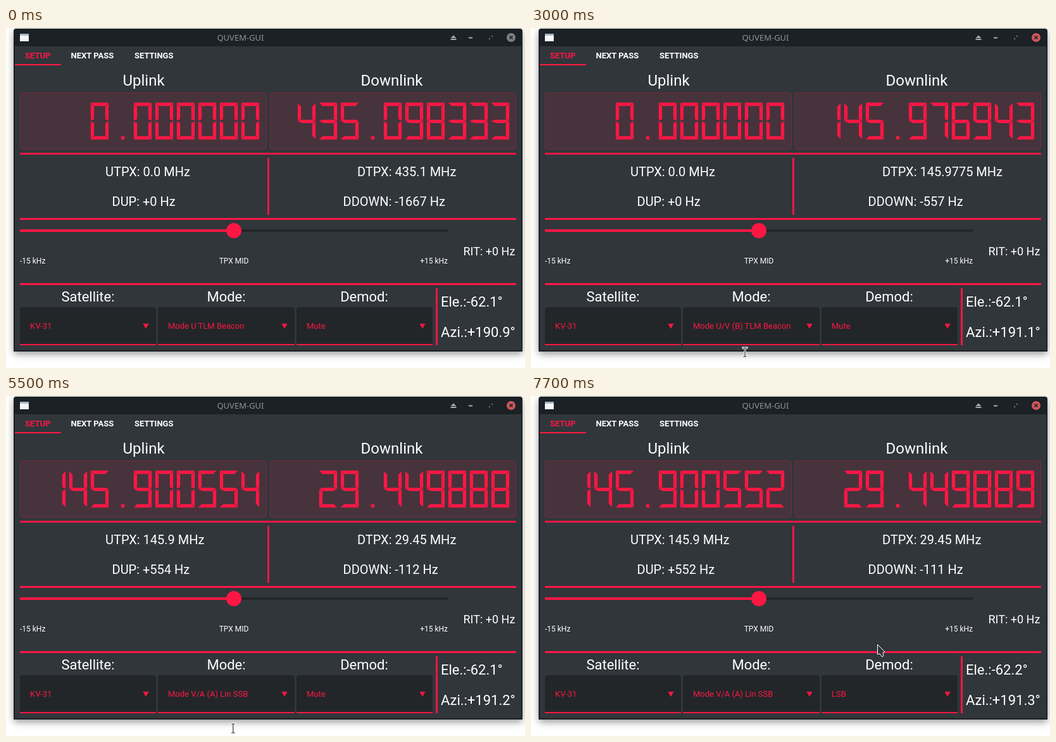
Write an HTML page that moves like this. It is 820 px wide and 537 px high and loops after 8000 ms.

```html
<!DOCTYPE html>
<html lang="en">
<head>
<meta charset="utf-8">
<style>
  html, body { margin: 0; width: 100%; height: 100%; overflow: hidden; background: #fff; }
  svg { display: block; font-family: Roboto, sans-serif; }
  .window { filter: drop-shadow(0 4px 6px rgba(0, 0, 0, .4)); }
</style>
</head>
<body>
<svg id="stage" width="820" height="537" viewBox="0 0 820 537"></svg>
<script>
const RED = '#ff1744', DARK = '#232629', BODY = '#31363b', WHITE = '#fff';
const LOOP = 8000, STEP = 100;

const MODES = ['Mode U TLM Beacon', 'Mode U/V (B) TLM Beacon', 'Mode V/A (A) Lin SSB'];
const DEMODS = ['NFM', 'LSB', 'USB', 'Mute'];
const COMBOS = {
  satellite: { x: 22, w: 215, items: ['KV-31'] },
  mode: { x: 240, w: 216, items: MODES },
  demod: { x: 459, w: 215, items: DEMODS },
};

// State changes over the loop: [time in ms, changed values]
const CHANGES = [
  [0, { satellite: 0, mode: 0, demod: 3, menu: null, active: false, beam: false,
        up: 0, down: 435.1, dup: 0, ddown: -1667, ele: '-62.1', azi: '+190.9' }],
  [900, { ddown: -1665 }],
  [1500, { ddown: -1663, azi: '+191.0', active: true, menu: 'mode' }],
  [2100, { ddown: -1662 }],
  [2400, { menu: null, mode: 1, beam: true }],
  [2500, { down: 145.9775, ddown: -557 }],
  [3000, { azi: '+191.1' }],
  [3300, { beam: false }],
  [3400, { ddown: -556 }],
  [3700, { menu: 'mode' }],
  [4200, { azi: '+191.2' }],
  [4400, { ddown: -555 }],
  [4900, { menu: null, mode: 2, beam: true, up: 145.9, down: 29.45, dup: 555, ddown: -112 }],
  [5500, { dup: 554 }],
  [5800, { beam: false }],
  [6200, { dup: 553, azi: '+191.3' }],
  [6600, { menu: 'demod' }],
  [7200, { dup: 552, ddown: -111, ele: '-62.2' }],
  [7700, { menu: null, demod: 1 }],
];

// Pointer path: [time, x, y]
const PATH = [
  [500, 61, 1], [1300, 337, 469], [1800, 337, 469], [1900, 337.5, 478], [2200, 337.5, 512],
  [3200, 337.5, 512], [3500, 333, 476], [3900, 333, 476], [4600, 357.5, 525],
  [5700, 358.5, 525], [5800, 337, 510], [5900, 337, 510], [6500, 545, 482],
  [6900, 545, 482], [7500, 547, 392], [LOOP, 547, 392],
];

const rect = (x, y, w, h, fill, extra = '') =>
  `<rect x="${x}" y="${y}" width="${w}" height="${h}" fill="${fill}" ${extra}/>`;
const path = (d, extra) => `<path d="${d}" ${extra}/>`;
const text = (x, y, size, str, fill = WHITE, extra = '') =>
  `<text x="${x}" y="${y}" font-size="${size}" fill="${fill}" ${extra}>${str}</text>`;
const MIDDLE = 'text-anchor="middle"';

// Seven-segment digits
const LEN = 29, THICK = 5, HALF = 2, ADVANCE = 34;
const E = LEN - 1, I = E - THICK;
const SEGMENTS = [
  [0, 0, [0, 0, E, 0, I, THICK, THICK, THICK]],
  [0, 1, [0, 0, THICK, THICK, THICK, LEN - 4, 0, LEN - 2]],
  [E, 1, [0, 0, 0, LEN - 2, -THICK, LEN - 4, -THICK, THICK]],
  [0, LEN, [0, 0, THICK, -HALF, I, -HALF, E, 0, I - 2, 3, THICK + 2, 3]],
  [0, LEN + 1, [0, 0, THICK, HALF, THICK, I - 1, 0, LEN - 2]],
  [E, LEN + 1, [0, 0, 0, LEN - 2, -THICK, I - 1, -THICK, HALF]],
  [0, 2 * LEN, [0, 0, E, 0, I, -THICK, THICK, -THICK]],
  [14, 2 * LEN, [0, 0, THICK, 0, THICK, -THICK, 0, -THICK]],
];
const GLYPHS = { 0: '012456', 1: '25', 2: '02346', 3: '02356', 4: '1235', 5: '01356',
                 6: '013456', 7: '025', 8: '0123456', 9: '012356', '.': '7' };

const segment = (ox, oy, index) => {
  const [dx, dy, pts] = SEGMENTS[index];
  return 'M' + pts.map((v, i) => v + (i % 2 ? oy + dy : ox + dx)).join(' ') + 'Z';
};

function lcd(x, width, mhz) {
  const chars = mhz.toFixed(6).padStart(11);
  const d = [...chars].map((c, i) =>
    [...(GLYPHS[c] || '')].map(s => segment(x + 10 + i * ADVANCE, 118, s)).join('')).join('');
  return rect(x + .5, 102.5, width - 1, 89, RED,
    `rx="4" fill-opacity=".1" stroke="${RED}" stroke-opacity=".3"`) +
    path(d, `fill="${RED}" stroke="${RED}" stroke-width=".3"`);
}

function titleBar(active) {
  const close = active ? '#cc575d' : '#7c8184';
  return rect(12, 1, 804, 510, '#1b2124', 'rx="4" class="window"') +
    rect(12, 300, 804, 211, '#1b2124') +
    rect(14, 29, 800, 480, BODY) +
    rect(22, 9, 14, 12, '#f4f6f7') + rect(22, 9, 14, 3, '#a9b7c4') +
    text(370.5, 20, 13, 'QUVEM-GUI', '#8d9598', `${MIDDLE} font-family="Noto Sans, sans-serif"`) +
    path('M702.5 16L707 11.5 711.5 16ZM702.5 17H711.5V19H702.5ZM731 14.5H737V16.5H731Z', 'fill="#a4abae"') +
    path('M766 12H769V15ZM763 15V18H766Z', 'fill="#6e7679"') +
    `<circle cx="798" cy="15" r="7" fill="${close}"/>` +
    path('M795.5 12.5L800.5 17.5M800.5 12.5L795.5 17.5', 'stroke="#1b2124" stroke-width="1.6"');
}

function combo(name, s) {
  const { x, w, items } = COMBOS[name], ax = x + w - 16;
  return path(`M${x} 501V445Q${x} 441 ${x + 4} 441H${x + w - 4}Q${x + w} 441 ${x + w} 445V501Z`, `fill="${DARK}"`) +
    rect(x, 499, w, 2, RED) +
    text(x + 16, 475, 13, items[s[name]], RED) +
    path(`M${ax - 4.5} 467H${ax + 4.5}L${ax} 475Z`, `fill="${RED}"`);
}

// The popup is placed so that its checked row covers the combo box
function popup(name, checked, pointerY) {
  const { x, w, items } = COMBOS[name], top = 441 - 44 * checked;
  const hovered = Math.floor((pointerY - top - 6) / 44);
  const rows = items.map((label, i) => {
    const y = top + 6 + 44 * i, hot = i === hovered;
    return (hot ? rect(x + 6, y, w - 12, 44, '#ff616f') : '') +
      (i === checked ? path(`M${x + 18} ${y + 23}l4 4 8.5 -9`,
        `fill="none" stroke="${hot ? DARK : RED}" stroke-width="1.5"`) : '') +
      text(x + 40.3, y + 27, 13, label, hot ? '#000' : WHITE);
  }).join('');
  return rect(x + 1, top + 1, w - 2, 44 * items.length + 10, DARK,
    'rx="3" stroke="#4f5b62" stroke-width="2"') + rows;
}

function pointer(t, beam) {
  const next = PATH.findIndex(p => p[0] > t);
  if (next < 1) return '';
  const [t0, x0, y0] = PATH[next - 1], [t1, x1, y1] = PATH[next];
  const k = (t - t0) / (t1 - t0);
  const x = x0 + (x1 - x0) * k, y = y0 + (y1 - y0) * k;
  const place = `transform="translate(${x} ${y})"`;
  if (!beam) {
    return path('M.5 .5V16L4 15 7.5 20 10 18.5 9 13.5 12 12Z',
      `${place} fill="${BODY}" stroke="#fff" stroke-linejoin="round"`);
  }
  const d = 'M-2.5 -7H3.5M.5 -7V7M-2.5 7H3.5';
  return `<g ${place}>${path(d, 'stroke="#fff" stroke-width="3" stroke-linecap="square"')}${path(d, `stroke="${BODY}" stroke-width="1.2"`)}</g>`;
}

const pointerY = t => {
  const next = PATH.findIndex(p => p[0] > t);
  const [t0, , y0] = PATH[next - 1], [t1, , y1] = PATH[next];
  return y0 + (y1 - y0) * (t - t0) / (t1 - t0);
};

const signed = hz => (hz < 0 ? '' : '+') + hz + ' Hz';
const mega = mhz => (mhz || '0.0') + ' MHz';

function scene(t) {
  const s = Object.assign({}, ...CHANGES.filter(c => c[0] <= t).map(c => c[1]));
  const bold = 'font-weight="700"';
  return titleBar(s.active) +
    text(30, 48, 13, 'SETUP', RED, bold) +
    text(102.5, 48, 13, 'NEXT PASS', WHITE, bold) +
    text(203, 48, 13, 'SETTINGS', WHITE, bold) +
    rect(14, 57, 73, 2, RED) +
    text(217.5, 91, 24, 'Uplink', WHITE, MIDDLE) +
    text(609.5, 91, 24, 'Downlink', WHITE, MIDDLE) +
    lcd(22, 390, s.up + s.dup / 1e6) + lcd(417, 389, s.down + s.ddown / 1e6) +
    [197, 300, 403].map(y => rect(22, y, 784, 3, RED)).join('') +
    rect(413, 205, 3, 90, RED) + rect(679, 411, 3, 90, RED) +
    text(157, 234, 20, 'UTPX: ' + mega(s.up)) +
    text(167.5, 281, 20, 'DUP: ' + signed(s.dup)) +
    text(555, 234, 20, 'DTPX: ' + mega(s.down)) +
    text(532.5, 281, 20, 'DDOWN: ' + signed(s.ddown)) +
    rect(22, 318, 676, 4, DARK, 'rx="1"') + rect(22, 318, 338, 4, RED) +
    `<circle cx="360" cy="320" r="12" fill="${RED}"/>` +
    text(22, 372, 12, '-15 kHz') +
    text(360, 372, 12, 'TPX MID', WHITE, MIDDLE) +
    text(698, 372, 12, '+15 kHz', WHITE, 'text-anchor="end"') +
    text(722.5, 359, 18, 'RIT: +0 Hz') +
    text(129.5, 432, 22, 'Satellite:', WHITE, MIDDLE) +
    text(348, 432, 22, 'Mode:', WHITE, MIDDLE) +
    text(566, 432, 22, 'Demod:', WHITE, MIDDLE) +
    Object.keys(COMBOS).map(name => combo(name, s)).join('') +
    text(687, 440, 22, `Ele.:${s.ele}°`) +
    text(687, 488, 22, `Azi.:${s.azi}°`) +
    (s.menu ? popup(s.menu, s[s.menu], pointerY(t)) : '') +
    pointer(t, s.beam);
}

const stage = document.getElementById('stage');
let shown = -1;
function tick() {
  const t = Math.floor(performance.now() % LOOP / STEP) * STEP;
  if (t !== shown) stage.innerHTML = scene(shown = t);
  requestAnimationFrame(tick);
}
tick();
</script>
</body>
</html>
```
